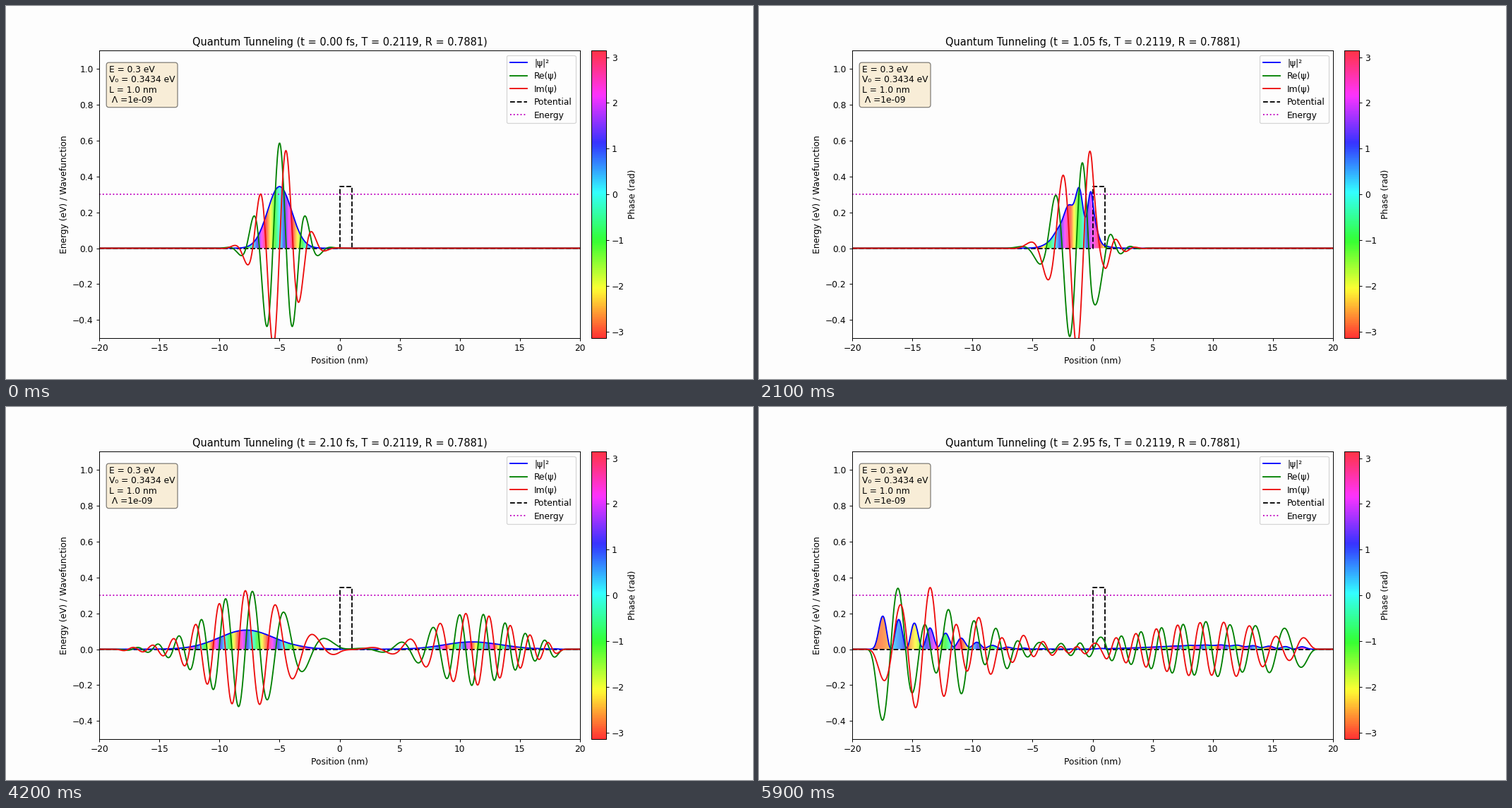
These frames come from a looping animation (1058 px wide and 529 px high, 6 s). A matplotlib script:

```python
import numpy as np
import matplotlib.pyplot as plt
from matplotlib.animation import FuncAnimation
from matplotlib.cm import ScalarMappable
from matplotlib.colors import Normalize
from matplotlib.path import Path

FRAMES, INTERVAL = 60, 100
FRAME_DT = 0.05            # fs shown per frame
ENERGY, BARRIER, WIDTH = 0.3, 0.3434, 1.0
HBAR_OVER_M = 0.115768     # nm^2 / fs for an electron
EV = 13.1234               # m / hbar^2 in 1 / (eV nm^2)
X0, SIGMA = -5.0, 1.0
WALL_X, WALL_SCALE, WALL_RISE = 18.0, 3.45, 0.25
SUBSTEPS = 8
BACKGROUND = "#fdfdfd"
RED = "#ec0c0c"

x = np.linspace(-20, 20, 1000)
dx = x[1] - x[0]
inside = (x >= 0) & (x <= WIDTH)
k0 = np.sqrt(2 * EV * ENERGY)
kappa = np.sqrt(2 * EV * (BARRIER - ENERGY))
T = 1 / (1 + BARRIER**2 * np.sinh(kappa * WIDTH)**2
         / (4 * ENERGY * (BARRIER - ENERGY)))


def evolve():
    """Split-step states; each frame advances by its own time, so motion speeds up."""
    dt = FRAME_DT * HBAR_OVER_M / SUBSTEPS
    soft_wall = WALL_SCALE * np.exp((np.abs(x) - WALL_X) / WALL_RISE)
    potential = EV * BARRIER * inside + np.minimum(soft_wall, 400)
    half = np.exp(-0.5j * potential * dt)
    k = 2 * np.pi * np.fft.fftfreq(x.size, dx)
    kinetic = np.exp(-0.5j * k**2 * dt)
    psi = np.sqrt(BARRIER) * np.exp(-(x - X0)**2 / (4 * SIGMA**2) + 1j * k0 * (x - X0))
    states = [psi]
    for frame in range(1, FRAMES):
        for _ in range(SUBSTEPS * frame):
            psi = half * np.fft.ifft(kinetic * np.fft.fft(half * psi))
        states.append(psi)
    return states


states = evolve()
phase_norm = Normalize(-np.pi, np.pi)

fig, ax = plt.subplots(figsize=(12, 6), dpi=88.1667, facecolor=BACKGROUND)
ax.set_facecolor(BACKGROUND)

fill = ax.imshow(np.angle(states[:1]), cmap="hsv", norm=phase_norm, alpha=0.65,
                 extent=(-20 - dx / 2, 20 + dx / 2, 0, 1.1), aspect="auto",
                 interpolation="nearest", zorder=1)
density, = ax.plot([], [], "b-", label="|ψ|²")
real, = ax.plot([], [], "g-", label="Re(ψ)")
imag, = ax.plot([], [], color=RED, label="Im(ψ)")
ax.plot([-20, 0, 0, WIDTH, WIDTH, 20], [0, 0, BARRIER, BARRIER, 0, 0],
        "k--", label="Potential", zorder=1.9)
ax.axhline(ENERGY, color="m", ls=":", label="Energy", zorder=1.8)
ax.set(xlim=(-20, 20), ylim=(-0.5, 1.1),
       xlabel="Position (nm)", ylabel="Energy (eV) / Wavefunction")
ax.legend(loc="upper right", facecolor=BACKGROUND, labelspacing=0.45)

ax.text(0.02, 0.95,
        f"E = {ENERGY} eV\nV₀ = {BARRIER} eV\nL = {WIDTH} nm\n Λ =1e-09",
        transform=ax.transAxes, va="top", linespacing=1.14,
        bbox=dict(boxstyle="round", facecolor="wheat", alpha=0.5))
fig.colorbar(ScalarMappable(phase_norm, "hsv"), ax=ax, pad=0.02,
             label="Phase (rad)", alpha=0.8)
title = ax.set_title("", fontsize=11.88)


def update(frame):
    psi = states[frame]
    prob = np.abs(psi)**2
    density.set_data(x, prob)
    real.set_data(x, psi.real)
    imag.set_data(x, psi.imag)

    outline = np.column_stack([np.r_[x[0], x, x[-1]], np.r_[0, prob, 0]])
    fill.set_data(np.angle(psi)[np.newaxis])
    fill.set_clip_path(Path(outline), transform=ax.transData)

    title.set_text(f"Quantum Tunneling (t = {frame * FRAME_DT:.2f} fs, "
                   f"T = {T:.4f}, R = {1 - T:.4f})")
    return density, real, imag, fill, title


anim = FuncAnimation(fig, update, frames=FRAMES, interval=INTERVAL,
                     init_func=lambda: update(0), repeat=True, repeat_delay=0)
plt.show()
```
